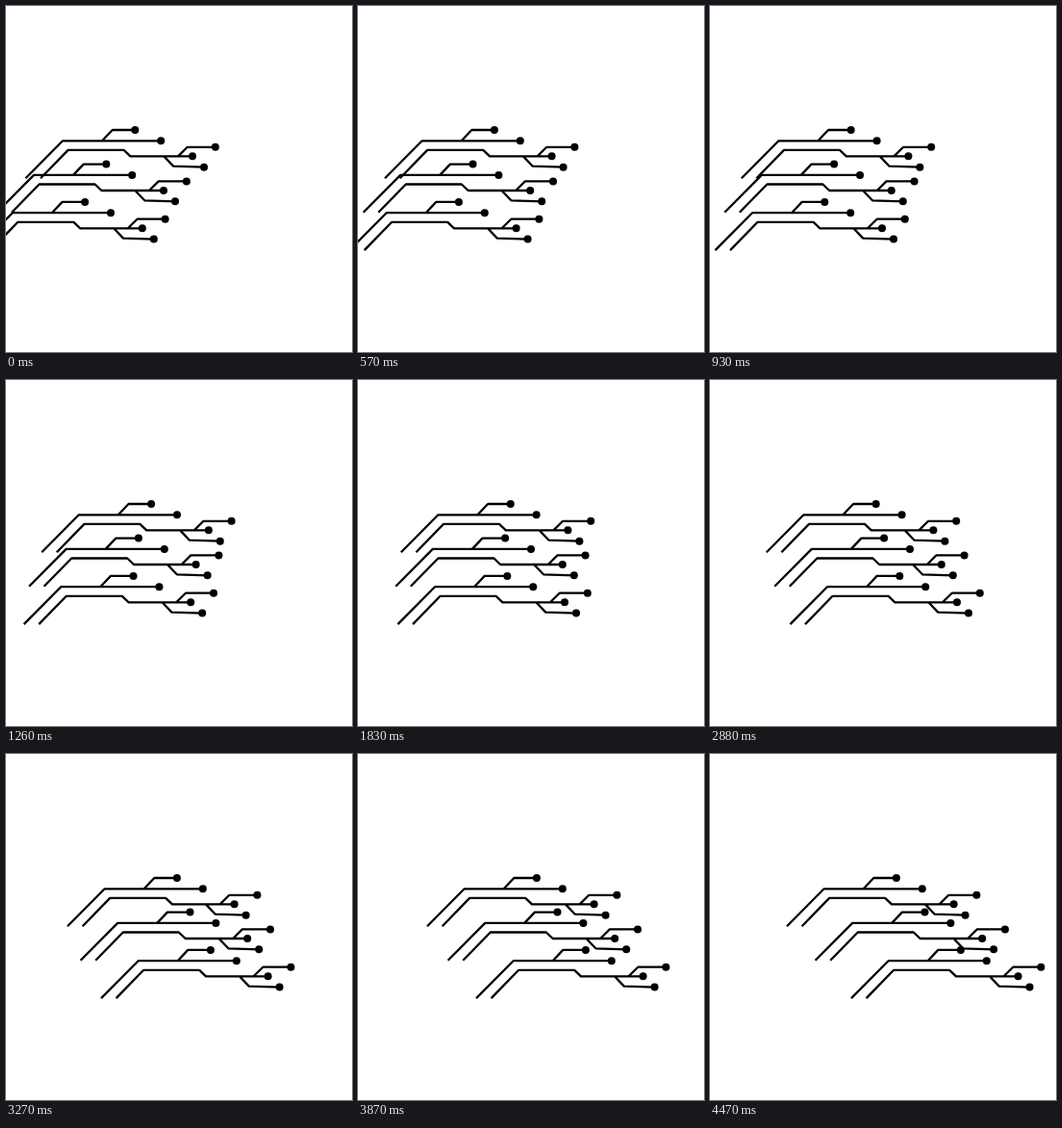
An HTML page for the animation above (4.5 s loop, 360x360 px).

```html
<!DOCTYPE html>
<html lang="en">
<head>
<meta charset="utf-8">
<title>Circuit lines</title>
<style>
  html, body { margin: 0; height: 100%; overflow: hidden; background: #fff; }
  svg { display: block; width: 100vw; height: 100vh; }
</style>
</head>
<body>
<svg viewBox="0 0 360 360">
  <defs>
    <g id="circuit">
      <path fill="none" stroke="#000" stroke-width="2.3" stroke-linejoin="round" d="
        M20.4 179.2 L59 140.3 H161
        M100 140.3 L110.7 129 H134
        M36 179.2 L64.6 149.9 H122.6 L129.4 156.4 H194
        M179 156.4 L188.7 146.8 H218
        M164.3 156.4 L174.2 166.7 L206 167.7"/>
      <circle cx="134.3" cy="129" r="4"/>
      <circle cx="161.2" cy="140.3" r="4"/>
      <circle cx="217.8" cy="146.8" r="4"/>
      <circle cx="194" cy="156.3" r="4"/>
      <circle cx="206" cy="167.7" r="4"/>
    </g>
  </defs>
  <use href="#circuit"/>
  <use href="#circuit"/>
  <use href="#circuit"/>
</svg>
<script>
  const LOOP = 4500, STEP = 30;
  const layers = [
    { x: 0, y: 0, travel: 60 },
    { x: -30, y: 35.6, travel: 120 },
    { x: -52.2, y: 74.9, travel: 180 },
  ];
  const uses = document.querySelectorAll('use');

  function draw(now) {
    const progress = Math.floor((now % LOOP) / STEP) * STEP / LOOP;
    layers.forEach(({ x, y, travel }, i) =>
      uses[i].setAttribute('transform', `translate(${x + travel * progress} ${y})`));
  }

  function tick() {
    draw(performance.now());
    requestAnimationFrame(tick);
  }
  tick();
</script>
</body>
</html>
```
